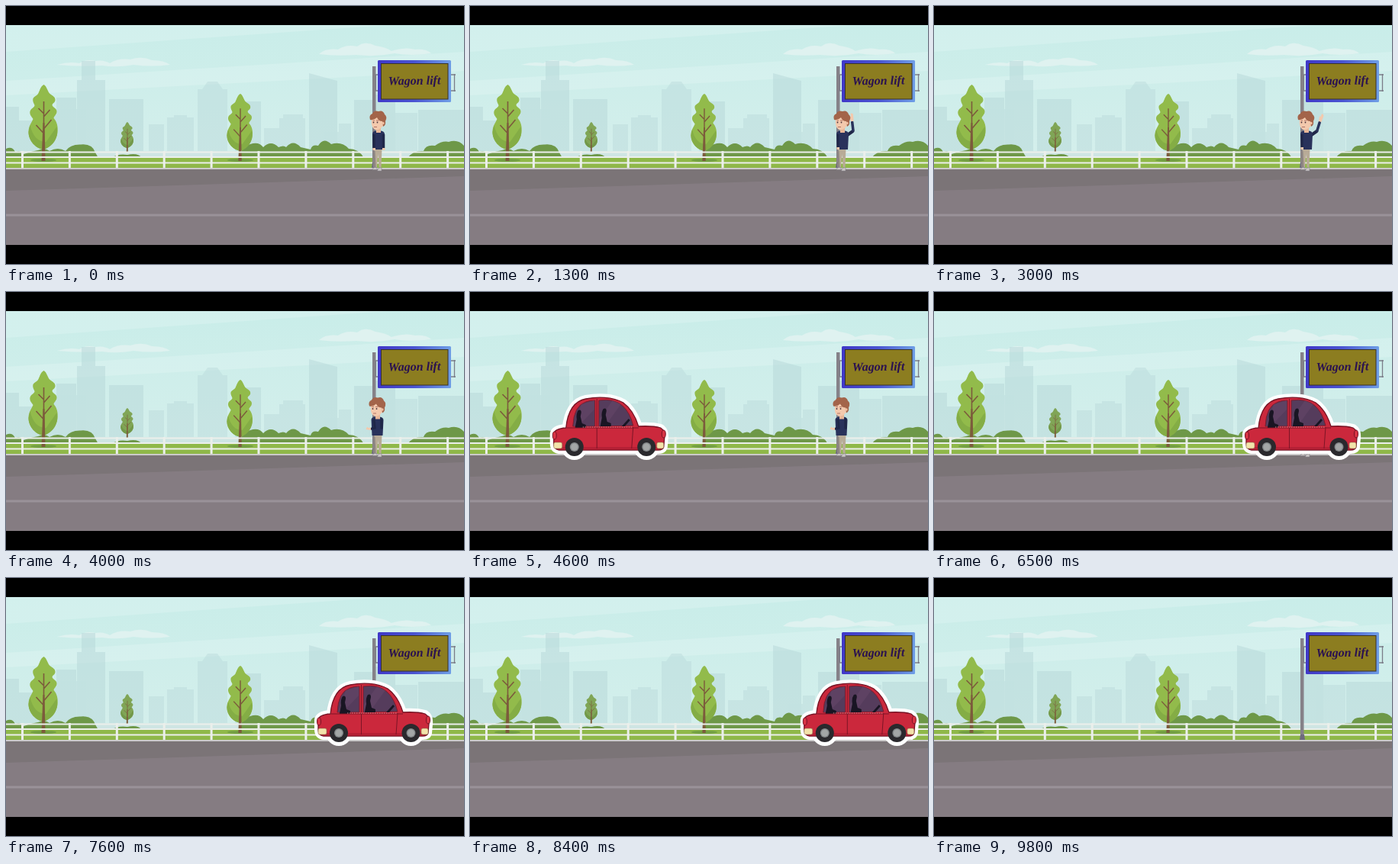
Write an HTML page that moves like this. It is 600 by 338 pixels and loops after 9900 ms.

```html
<!DOCTYPE html>
<html lang="en">
<head>
<meta charset="utf-8">
<title>Roadside pickup</title>
<style>
  html, body { margin: 0; width: 100%; height: 100%; overflow: hidden; background: #000; }
  svg { display: block; width: 600px; height: 338px; }
  .sign { font: italic bold 16px "Liberation Serif", serif; fill: #2a1150; }
  .tree { --leaf: #92bb4b; --shade: #84ad45; }
  .far { --leaf: #80a556; --shade: #729849; }
</style>
</head>
<body>
<svg viewBox="0 0 600 338">
  <defs>
    <linearGradient id="sky" x2="0" y2="1">
      <stop stop-color="#c9ede9"/><stop offset="1" stop-color="#d5efec"/>
    </linearGradient>
    <linearGradient id="trim">
      <stop stop-color="#4038c8"/><stop offset=".5" stop-color="#4a55d2"/><stop offset="1" stop-color="#6f9fe6"/>
    </linearGradient>
    <clipPath id="view"><rect y="25" width="600" height="288"/></clipPath>
    <g id="tree">
      <path fill="var(--leaf)" d="M0-100C4-98 5-91 8-88C12-85 15-84 15-80C15-76 11-76 11-73C12-70 17-69 17-65C17-60 13-59 13-56C17-52 19-45 18-37C17-27 8-18 0-15C-10-16-20-26-20-38C-20-46-16-50-14-55C-16-58-19-61-18-65C-17-69-12-70-12-73C-13-76-15-78-14-82C-12-85-8-86-7-89C-5-93-4-98 0-100Z"/>
      <path fill="var(--shade)" d="M-18-47C-15-33-8-25 3-25L17-45C20-30 12-19 0-15C-10-16-20-26-20-38Z"/>
      <path fill="none" stroke="#7c5b3c" stroke-width="1.600" d="M0-30V-78M0-42L10-54M0-36L-10-47M0-58L8-67M0-62L-7-69"/>
      <path fill="#7c5b3c" d="M-1-50H1L2 0H-3Z"/>
    </g>
    <path id="shell" d="M22 178C24 158 32 143 48 140C63 137 83 137 97 145C108 153 114 166 117 176Q136 175 146 178Q152 182 151 191L150 203Q149 207 143 207H13Q6 206 6 198V186Q7 179 22 178Z"/>
    <g id="wheel">
      <circle r="12" fill="#2a292d"/><circle r="6" fill="#85898b"/><circle r="4.500" fill="#a3a6a6"/>
    </g>
    <g id="legs">
      <path fill="#b8ab97" d="M482.500 186H492.500L491.500 211H488.500L487.500 194L486 211H483Z"/>
      <path fill="#8e8683" d="M481 190H483.500L484.500 211H481Z"/>
      <path fill="#cbc7c5" stroke="#85818a" stroke-width=".6" d="M480 213.500Q482 210.500 486 211.500V214.500H480ZM487 214.500Q488 211 492 211.500V216H486.500Z"/>
    </g>
    <g id="head">
      <path fill="#e8b798" d="M485 158H491V166H485Z"/>
      <path fill="#f3c9ad" d="M479 148Q478 158 482 161Q486 164 491 160Q496 156 496 149L490 144H482Z"/>
      <path fill="#a3644a" d="M477 149Q475 143 480 141Q482 136 488 138Q494 136 496 142Q500 145 497 151Q498 156 494 158L493 151Q488 151 486 146Q482 150 477 149Z"/>
      <circle cx="494" cy="153.500" r="1.700" fill="#efbfa1"/>
      <g fill="#493039"><circle cx="481.500" cy="152.500" r=".9"/><circle cx="486.500" cy="152.500" r=".9"/></g>
      <path fill="none" stroke="#a15d52" stroke-width=".8" d="M480.500 150H483M485 150H488.500M482 158.500H486"/>
    </g>
    <path id="torso" fill="#29325b" d="M480 167Q481 163 486 163.500H491Q496 164 496 168L495 188H481Z"/>
  </defs>

  <g clip-path="url(#view)">
    <rect y="25" width="600" height="190" fill="url(#sky)"/>
    <path fill="#fff" opacity=".16" d="M0 25H500L0 60ZM0 98L600 60V85L0 117Z"/>
    <g fill="#dff2f0">
      <path d="M67 77Q83 72 96 75Q105 69 117 72Q128 70 136 75Q147 68 163 70Q178 65 191 71Q207 71 215 77Q190 80 167 77Q145 81 126 78Q96 80 67 77Z"/>
      <path d="M410 63Q419 55 435 57Q446 50 460 53Q470 45 484 52Q498 54 505 59Q523 53 536 57Q551 56 557 62Q530 66 509 62Q485 67 459 64Q432 66 410 63Z"/>
    </g>
    <g fill="#b7d8d9" opacity=".5">
      <path d="M0 198V132H17V150H46V143H66V120H92V198ZM93 198V97H99V72H117V97H130V198ZM135 198V122H180V198ZM300 198V125H334V198ZM397 198V88L434 98V198ZM456 198V123H482V116H510V198ZM540 198V136H600V198Z"/>
      <path opacity=".8" d="M68 198V135H105V198ZM187 198V155H207V198ZM211 198V146H220V143H237V146H246V198ZM251 198V109H257L264 99H277L284 109H290V198ZM338 198V160H358V147H363V142H389V147H392V198ZM416 198V165H436V154H452V198ZM500 198V140H539V198Z"/>
    </g>
    <rect y="190" width="600" height="9" fill="#cee5e3"/>
    <g fill="#6e9848">
      <path d="M0 199V187Q8 183 12 191Q20 189 23 194Q35 190 42 189Q51 185 57 190Q68 184 78 190Q84 181 98 181.500Q113 180 117 192L121 199Z"/>
      <path d="M138 199Q147 193 159 195Q173 192 178 199Z"/>
      <path d="M306 199Q308 184 320 181Q331 177 337 185Q347 175 357 185Q364 182 367 185Q376 174 386 185L399 188Q401 181 409 183Q416 171 426 181Q440 177 449 187Q462 187 469 199Z"/>
      <path d="M526 199Q533 189 547 190Q550 181 562 183Q572 176 580 178Q592 174 600 183V199Z"/>
    </g>
    <rect y="198" width="600" height="16" fill="#8fb849"/>
    <g fill="#729f43"><ellipse cx="49" cy="202" rx="17" ry="2"/><ellipse cx="307" cy="202" rx="17" ry="2"/></g>
    <use class="tree" href="#tree" transform="translate(49.500 203)"/>
    <use class="tree" href="#tree" transform="translate(307 203) scale(.88)"/>
    <use class="far" href="#tree" transform="translate(159 192) scale(.44 .4)"/>
    <g id="fence" fill="#ebefeb">
      <path d="M0 190.500H600V192.500H0ZM0 197H600V199H0ZM0 204.500H600V206.500H0Z"/>
    </g>
    <rect y="212" width="600" height="2.500" fill="#cbcaca"/>
    <rect y="214" width="600" height="99" fill="#857c82"/>
    <path fill="#7b7477" d="M0 214H600V223L0 242Z"/>
    <path fill="#9a9299" d="M0 272.500H600V275.500H0Z"/>

    <path fill="#858188" d="M480 79H484.500V206H480Z"/>
    <path fill="#6e6a7e" d="M480 205H485L486 212H479Z"/>
    <path fill="none" stroke="#7b7d89" stroke-width="1.300" d="M487 90H484.500V111H487M583 90H589M583 111H589M587.500 89V112"/>
    <rect x="487" y="71" width="96" height="55" rx="1.500" fill="url(#trim)"/>
    <rect x="491.500" y="75.500" width="87.500" height="46.500" fill="#8c7d20" stroke="#38332b"/>
    <text class="sign" x="535" y="103" text-anchor="middle" transform="rotate(-1 535 98)">Wagon lift</text>

    <g id="man">
      <use href="#legs"/>
      <g id="idle">
        <use href="#torso"/>
        <path fill="none" stroke="#1f2748" stroke-width="3.500" d="M494.500 168V186M482 168V186"/>
        <path fill="#f3c9ad" d="M493 186H496.500V189H493ZM480.500 186H484V189H480.500Z"/>
        <use href="#head"/>
      </g>
      <g id="wave">
        <path fill="none" stroke="#1f2748" stroke-width="4" stroke-linecap="round" d="M493 170L501.500 164"/>
        <g id="forearm">
          <path stroke="#29325b" stroke-width="3.500" stroke-linecap="round" d="M502 163V152"/>
          <path fill="#f3c9ad" d="M500.500 151L499.500 144L501 145L501.500 140.500L503 140.500L504.500 142L504 151Z"/>
        </g>
        <use href="#torso"/>
        <path fill="none" stroke="#1f2748" stroke-width="3" d="M482 168V185"/>
        <path fill="#f3c9ad" d="M480.500 185H484V188H480.500Z"/>
        <use href="#head"/>
      </g>
      <g id="hail">
        <use href="#torso" transform="translate(-1.500 0)"/>
        <path fill="none" stroke="#1f2748" stroke-width="3.300" stroke-linecap="round" d="M482 168L483 178L479 179M492 167V178"/>
        <path fill="#f3c9ad" d="M478 177.500L474 178V176.500L472.500 177.500L471.500 180L478 181Z"/>
        <use href="#head" transform="translate(-1 .5)"/>
      </g>
    </g>

    <g id="car">
      <g fill="#fff" stroke="#fff" stroke-width="10" stroke-linejoin="round">
        <use href="#shell"/><circle cx="33" cy="203" r="12"/><circle cx="127.500" cy="203" r="12"/>
      </g>
      <use href="#shell" fill="#cb283c" stroke="#751324" stroke-width="1.300"/>
      <path fill="#b52035" d="M8 203H149Q148 206 143 206.500H13Q9 206 8 203Z"/>
      <path fill="#553c5c" stroke="#811a2c" d="M31 176Q32 149 48 144Q53 142 60 142V176ZM65 142Q85 139 96 149Q106 158 110 175L65 176Z"/>
      <path fill="#69496c" opacity=".45" d="M42 147L59 142V154L38 176H32ZM83 142L94 147L73 176H66V166Z"/>
      <g fill="#191523">
        <path id="seat" d="M34 177L36 167Q35 159 38 155Q42 153 42 158L41 163L43 172L48 174V178H34Z"/>
        <use href="#seat" x="33" y="-2"/>
        <path d="M95 176L104 166L106 168L99 176Z"/>
      </g>
      <path fill="none" stroke="#7c1526" stroke-width="1" d="M62.500 140V205M23 178H117M110 177L108 205"/>
      <path fill="none" stroke="#f1a6a7" stroke-width=".8" stroke-dasharray="1.500 1.500" d="M44 177H109"/>
      <g fill="#f3e3aa" stroke="#8b6f4e" stroke-width=".6">
        <rect x="6" y="197" width="11" height="8" rx="2"/><rect x="141" y="197" width="9" height="8" rx="2"/>
      </g>
      <g fill="#d93445" stroke="#751324"><ellipse cx="7" cy="188" rx="2.500" ry="5"/><ellipse cx="150" cy="186" rx="2.500" ry="5"/></g>
      <use href="#wheel" x="33" y="203"/>
      <use href="#wheel" x="127.500" y="203"/>
    </g>
  </g>
</svg>
<script>
  const LOOP = 9900, STEP = 100, STOP_X = 403;
  const $ = id => document.getElementById(id);
  const show = (id, on) => $(id).style.display = on ? '' : 'none';
  const clamp = p => Math.max(0, Math.min(1, p));
  const ease = p => (1 - Math.cos(Math.PI * clamp(p))) / 2;

  for (let i = 0; i < 10; i++) {
    const post = document.createElementNS('http://www.w3.org/2000/svg', 'rect');
    const box = { x: 20 + i * 61.9, y: 190, width: 3, height: 24 };
    for (const k in box) post.setAttribute(k, box[k]);
    $('fence').append(post);
  }

  function draw(t) {
    show('man', t < 7000);
    show('idle', t < 1100);
    show('wave', t >= 1100 && t < 3100);
    show('hail', t >= 3100);

    const swing = 5 - 12 * Math.cos(2 * Math.PI * (t - 1300) / 680);
    $('forearm').setAttribute('transform', `rotate(${swing} 502 163)`);

    const arrive = ease((t - 4000) / 1255);
    const leave = 1 - Math.cos(Math.PI / 2 * clamp((t - 8100) / 900));
    const x = STOP_X - 560 * (1 - arrive) + 215 * leave;
    $('car').setAttribute('transform', `translate(${x} 0)`);
    show('car', t > 4000 && t < 9000);
  }

  const start = performance.now();
  function tick() {
    const t = (performance.now() - start) % LOOP;
    draw(Math.floor(t / STEP) * STEP);
    requestAnimationFrame(tick);
  }
  tick();
</script>
</body>
</html>
```
